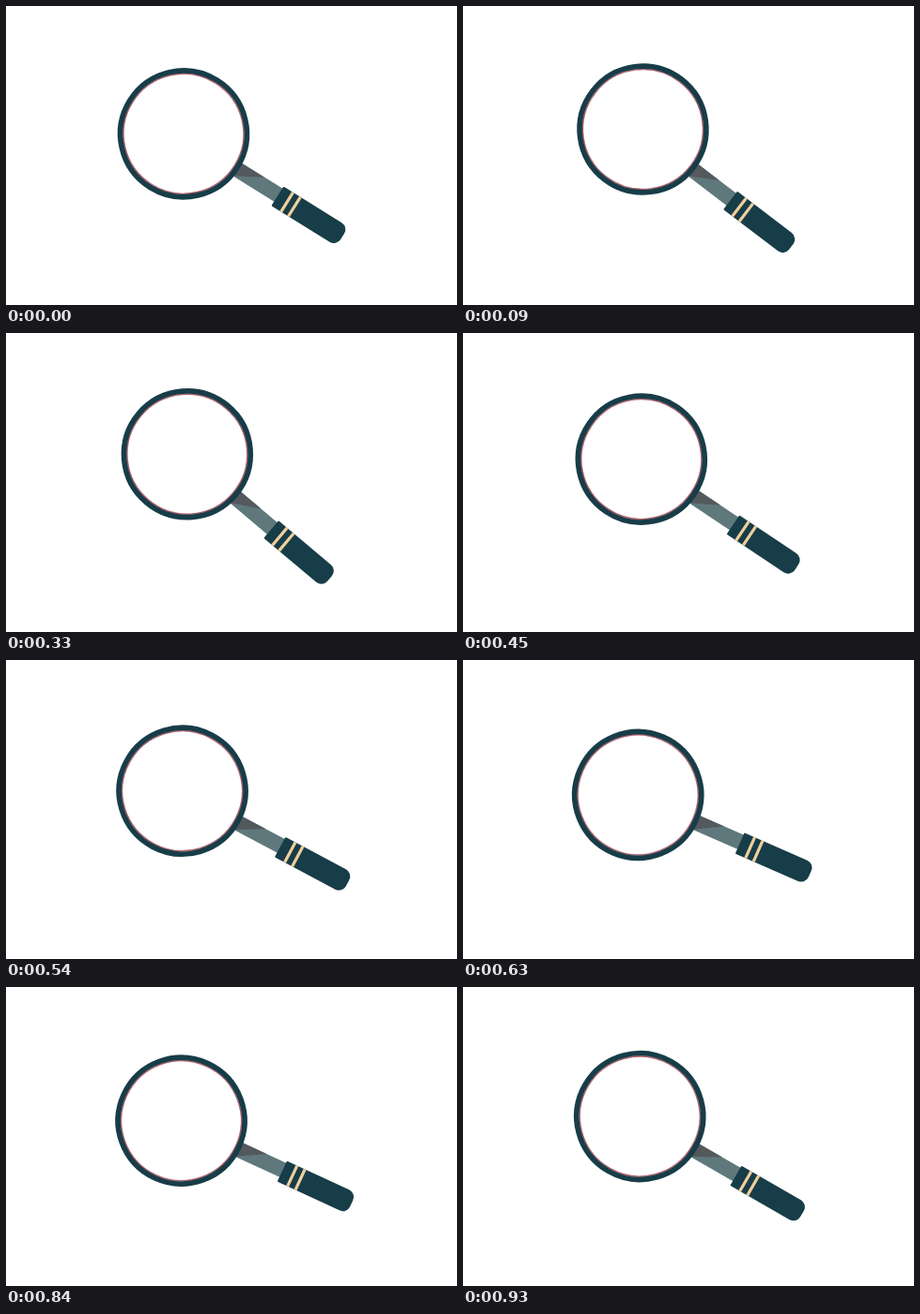
These frames come from a looping animation (480x319 px, 960 ms). An HTML page:

```html
<!DOCTYPE html>
<html lang="en">
<head>
<meta charset="utf-8">
<title>Magnifying glass</title>
<style>
  html, body { margin: 0; width: 100%; height: 100%; overflow: hidden; background: #fff; }
  svg { display: block; width: 480px; height: 319px; }
</style>
</head>
<body>
<svg viewBox="0 0 480 319">
  <g id="glass">
    <!-- local origin: lens centre, x axis along the handle -->
    <g transform="translate(189 136.3) rotate(31.9)">
      <path fill="#5f787c" d="M64-6.1H122V10.5H64Z"/>
      <path fill="#53595d" d="M64-6.1H97.5L68 10.5H64Z"/>
      <path fill="#173d48" d="M121-8.4H193a8.5 8.5 0 0 1 8.5 8.5V7.4a8.5 8.5 0 0 1-8.5 8.5H121a1 1 0 0 1-1-1V-7.4a1 1 0 0 1 1-1Z"/>
      <path stroke="#efcf9c" stroke-width="3.2" d="M132-8.4V15.9M141.2-8.4V15.9"/>
      <circle r="64" fill="#fff" stroke="#b0626e" stroke-width="1.6"/>
      <circle r="67.35" fill="none" stroke="#173d48" stroke-width="5.7"/>
    </g>
  </g>
</svg>
<script>
  const LOOP = 960, STEP = 30, SWING = 9.9;
  const glass = document.getElementById('glass');
  const start = performance.now();

  function draw() {
    const time = (performance.now() - start) % LOOP;
    const held = Math.floor((time + 0.5) / STEP) * STEP;
    const angle = SWING * Math.sin(2 * Math.PI * held / LOOP);
    glass.setAttribute('transform', `rotate(${angle.toFixed(3)} 240 159.5)`);
    requestAnimationFrame(draw);
  }
  draw();
</script>
</body>
</html>
```
